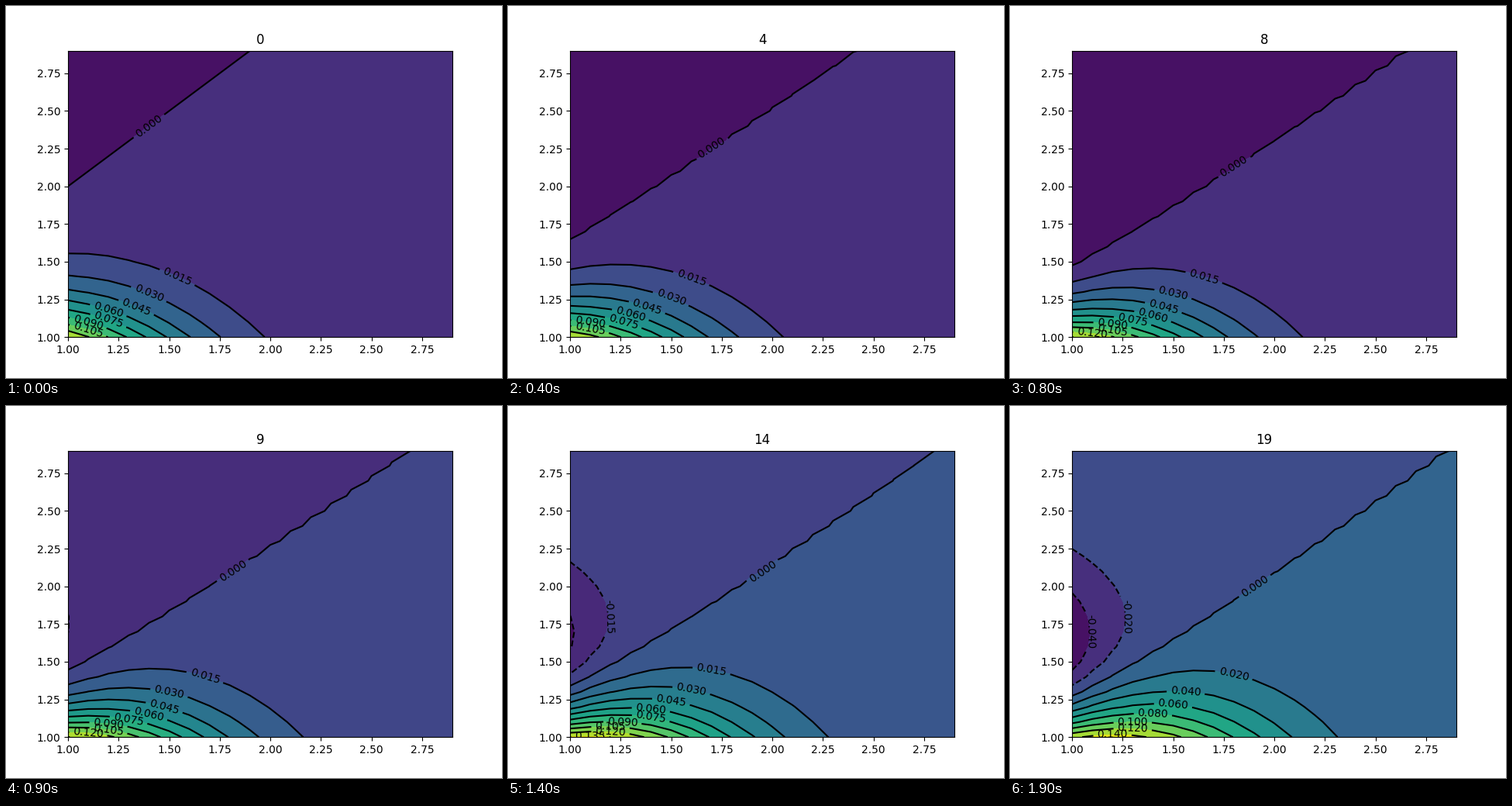
Animation of 640 by 480 pixels, one loop 2 s. Source, as a matplotlib script:

```python
import numpy as np
import matplotlib.pyplot as plt
from matplotlib.animation import FuncAnimation

FRAMES = 20
INTERVAL = 100  # ms
LEVELS = 12

axis = np.arange(1, 3, 0.1)
X, Y = np.meshgrid(axis, axis)

fig, ax = plt.subplots(figsize=(6.4, 4.8), dpi=100)


def surface(i):
    p = 1 + i / 10
    return (1 + X**p - Y**p) * np.exp(-X**2 - Y**2)


def draw(i):
    ax.clear()
    z = surface(i)
    ax.contourf(X, Y, z, LEVELS)
    lines = ax.contour(X, Y, z, LEVELS, colors="black")
    ax.clabel(lines, inline=True, fontsize=10, fmt="%1.3f")
    ax.set_title(str(i))


anim = FuncAnimation(fig, draw, frames=FRAMES, interval=INTERVAL,
                     init_func=lambda: draw(0), repeat=True)
plt.show()
```
